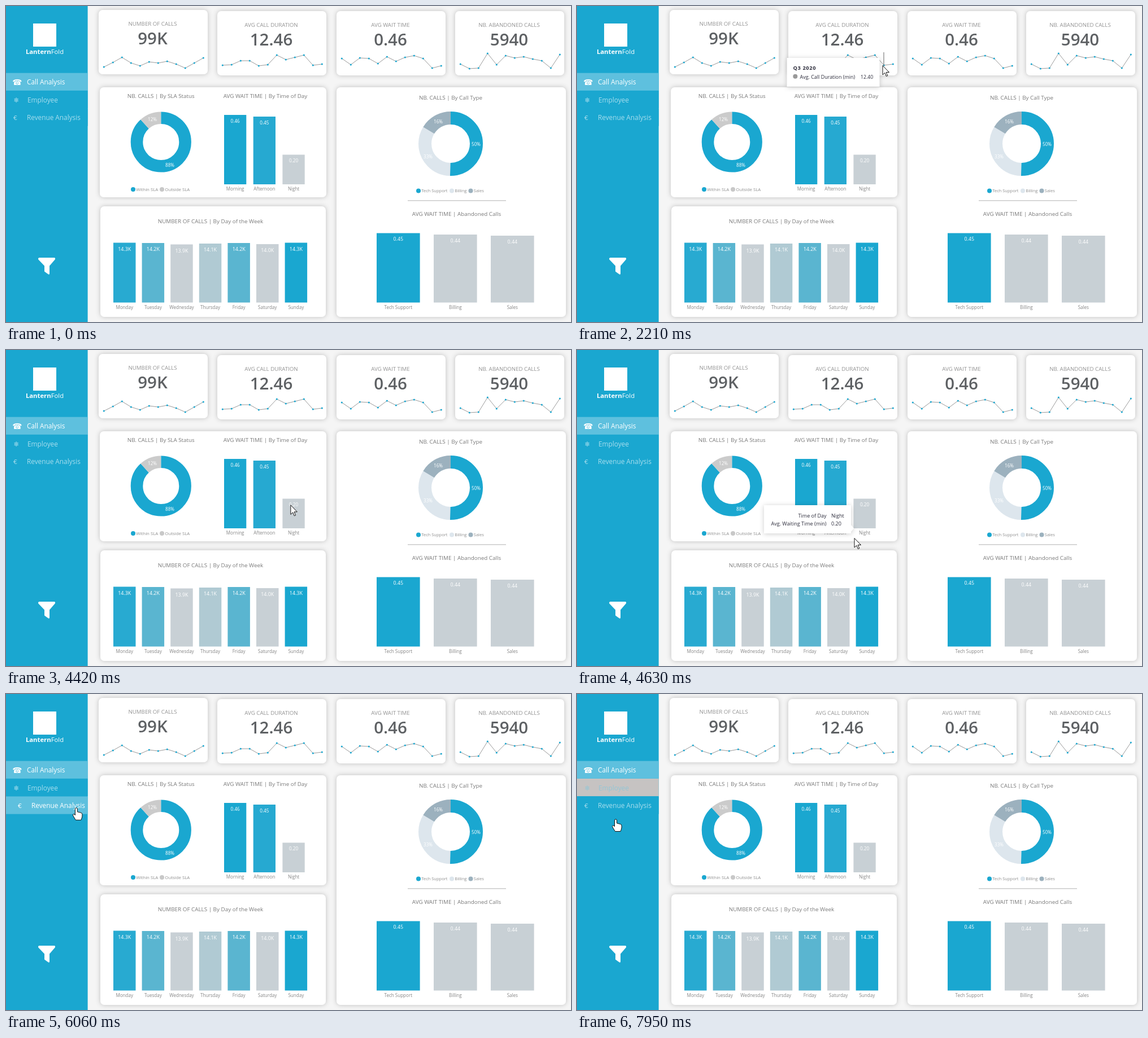
An HTML page that plays this animation: 1000 by 560 pixels, repeating every 8000 ms.

```html
<!DOCTYPE html>
<html lang="en">
<head>
<meta charset="utf-8">
<title>Call dashboard</title>
<style>
  html, body { margin: 0; width: 100%; height: 100%; overflow: hidden; background: #f5f5f5; }
  svg { display: block; width: 100%; height: 100%; font-family: "Open Sans", "Noto Sans", sans-serif; }
  .icon { font-family: "DejaVu Sans", sans-serif; }
  .card { fill: #fff; filter: drop-shadow(0 0 4px rgba(0, 0, 0, .22)); }
  .tip path { fill: #fff; filter: drop-shadow(0 1px 4px rgba(0, 0, 0, .2)); }
</style>
</head>
<body>
<svg id="stage" viewBox="0 0 1000 560"></svg>
<script>
const BLUE = '#1aa7d0', GREY = '#c8d0d5', HOVER = '#5ec0de', INK = '#2b2b3a';
const LOOP = 8000, MENU = 144.6;

// Text is placed by the vertical centre of its capitals.
const text = (s, x, y, size, fill, anchor = 'middle', extra = '') =>
  `<text x="${x}" y="${y + size * .36}" font-size="${size}" fill="${fill}" text-anchor="${anchor}" ${extra}>${s}</text>`;
const rect = (x, y, w, h, fill, extra = '') =>
  `<rect x="${x}" y="${y}" width="${w}" height="${h}" fill="${fill}" ${extra}/>`;
const dot = (x, y, r, fill) => `<circle cx="${x}" cy="${y}" r="${r}" fill="${fill}"/>`;
const card = (x, y, w, h) => rect(x, y, w, h, '#fff', 'rx="7" class="card"');
const title = (s, x, y) => text(s, x, y, 9.85, '#7a7a7a');

function kpi(x, y, label, value, heights) {
  const pts = heights.map((h, i) => [x + 9.3 + i * 16, h]);
  return card(x, y, 193, 114) +
    text(label, x + 95.5, y + 24.3, 9.7, '#939393') +
    text(value, x + 95.5, y + 50.6, 29.5, '#5e6164', 'middle', 'font-weight="600"') +
    `<polyline points="${pts.join(' ')}" fill="none" stroke="#9a9a9a"/>` +
    pts.map(p => dot(...p, 1.6, BLUE)).join('');
}

function donut(x, y, r, width, slices) {
  let start = 0;
  return slices.map(([share, fill]) => {
    const arc = `<circle cx="${x}" cy="${y}" r="${r}" fill="none" stroke="${fill}" stroke-width="${width}"
      pathLength="100" stroke-dasharray="${share} ${100 - share}" stroke-dashoffset="${-start}"
      transform="rotate(-90 ${x} ${y})"/>`;
    start += share;
    return arc;
  }).join('');
}

// Each bar: name, value, top, colour.
const bars = (x, step, w, bottom, labelSize, nameY, list) =>
  list.map(([name, value, top, fill], i) => {
    const left = x + i * step, mid = left + w / 2;
    return rect(left, top, w, bottom - top, fill) +
      text(value, mid, top + 10.8, labelSize, '#fff') +
      text(name, mid, nameY, 8.05, '#858585');
  }).join('');

const legend = (y, size, list) => list.map(([x, name, fill]) =>
  dot(x, y, 4, fill) + text(name, x + 5.3, y, size, '#8f8f8f', 'start')).join('');

const row = (id, y, icon, iconX, iconSize, name, nameX) => `<g id="${id}">` +
  rect(0, y, MENU, 31.2, BLUE) + '<g>' +
  text(icon, iconX, y + 16.3, iconSize, 'inherit', 'middle', 'class="icon"') +
  text(name, nameX, y + 16.3, 11.8, 'inherit', 'start') + '</g></g>';

// Tooltip with two label/value rows; side is where its pointer sits.
function tip(id, x, y, w, side, pointY, mid, rows) {
  const edge = side < 0 ? x : x + w;
  return `<g id="${id}" class="tip"><path d="M${x} ${y}h${w}v50h${-w}z
    M${edge} ${pointY - 6}l${5 * side} 6l${-5 * side} 6z"/>` +
    rows.map(([label, value], i) =>
      text(label, x + mid, y + 19 + i * 13.6, 9, INK, 'end') +
      text(value, x + mid + 8.5, y + 19 + i * 13.6, 9, INK, 'start')).join('') + '</g>';
}

const stage = document.getElementById('stage');
stage.innerHTML =
  rect(0, 0, MENU, 560, BLUE) +
  rect(48, 31, 41, 41, '#fff') +
  text('<tspan font-weight="700">Lantern</tspan>Fold', 68.5, 80.5, 11.3, '#fff') +
  row('calls', 118.7, '☎\uFE0E', 20, 14, 'Call Analysis', 37) +
  row('employee', 150, '❄\uFE0E', 18.5, 12, 'Employee', 38) +
  row('revenue', 181.5, '€', 16.5, 11, 'Revenue Analysis', 37) +
  '<path d="M58.500 446H86Q88 447.500 86.500 449.500L77 460.500V474.500Q76.500 476.500 75 475.500L68 470.500V460.500L57.500 449.500Q56 447.500 58.500 446Z" fill="#fff"/>' +

  kpi(164, 7, 'NUMBER OF CALLS', '99K', [108, 100, 91, 101, 106, 99, 101, 98, 103, 110, 101, 92]) +
  kpi(374, 9, 'AVG CALL DURATION', '12.46', [105, 104, 97, 97, 106, 104, 87, 95, 91, 87, 105, 103]) +
  kpi(585, 9, 'AVG WAIT TIME', '0.46', [93, 104, 92, 93, 102, 90, 98, 91, 88, 93, 110, 106]) +
  kpi(795, 9, 'NB. ABANDONED CALLS', '5940', [103, 111, 110, 84, 104, 88, 92, 90, 94, 97, 110, 86]) +

  card(166, 144, 401, 195) +
  title('NB. CALLS | By SLA Status', 274.3, 159) +
  donut(274.3, 241, 42.8, 21.6, [[88.25, BLUE], [11.75, '#cbcbcb']]) +
  text('88%', 290, 282, 8.1, '#fff') + text('12%', 259, 201.5, 8.1, '#fff') +
  legend(325, 7.85, [[225, 'Within SLA', BLUE], [276, 'Outside SLA', '#c8c8c8']]) +
  title('AVG WAIT TIME | By Time of Day', 459, 159) +
  bars(386, 51.7, 39.3, 316, 8.2, 324, [
    ['Morning', '0.46', 193, BLUE], ['Afternoon', '0.45', 196, '#26a9d1'], ['Night', '0.20', 263.5, GREY]]) +

  card(167, 355, 399, 196) +
  title('NUMBER OF CALLS | By Day of the Week', 362, 381) +
  bars(190, 50.6, 39.5, 525.5, 8.9, 534, [
    ['Monday', '14.3K', 419.5, '#28aad1'], ['Tuesday', '14.2K', 420, '#5ab5d0'],
    ['Wednesday', '13.9K', 422.5, GREY], ['Thursday', '14.1K', 421, '#b0cad3'],
    ['Friday', '14.2K', 420, '#5ab5d0'], ['Saturday', '14.0K', 422, GREY],
    ['Sunday', '14.3K', 419.5, BLUE]]) +

  card(585, 144, 406, 407) +
  title('NB. CALLS | By Call Type', 787, 162) +
  donut(787, 244, 45.5, 23, [[50.3, BLUE], [33.4, '#dde6ed'], [16.3, '#9cb1be']]) +
  text('50%', 832, 245, 8.1, '#fff') + text('33%', 747, 267, 8.1, '#fff') + text('16%', 765, 205, 8.1, '#fff') +
  legend(327.5, 7.5, [[730, 'Tech Support', BLUE], [789, 'Billing', '#dde6ed'], [822.5, 'Sales', '#9cb1be']]) +
  rect(711, 344.3, 174, 1.2, '#bdbdbd') +
  title('AVG WAIT TIME | Abandoned Calls', 797.5, 368) +
  bars(656, 101, 76.6, 525.5, 8.8, 534, [
    ['Tech Support', '0.45', 402.5, BLUE], ['Billing', '0.44', 405, GREY], ['Sales', '0.44', 407, GREY]]) +

  rect(542.5, 82, 1, 24, '#666', 'id="hair"') +
  '<g id="quarter" class="tip"><path d="M371.500 92h164v51h-164z"/>' +
  text('Q3 2020', 382.5, 109.5, 9.3, INK, 'start', 'font-weight="700" letter-spacing=".6"') +
  dot(386.3, 124.7, 4, '#999') +
  text('Avg. Call Duration (min)', 394.5, 125.5, 8.95, INK, 'start') +
  text('12.40', 502, 125.5, 8.7, INK, 'start') + '</g>' +
  tip('night', 331, 275, 154, 1, 316, 110.5, [['Time of Day', 'Night'], ['Avg. Waiting Time (min)', '0.20']]) +
  tip('morning', 396, 286, 159, -1, 296, 110.5, [['Time of Day', 'Morning'], ['Avg. Waiting Time (min)', '0.46']]) +
  tip('sla', 320, 232, 153, -1, 242, 70, [['SLA Status', 'Within SLA'], ['Total Nb. Calls', '87345 (88.25%)']]) +

  '<g fill="#fff" stroke="#111" stroke-linejoin="round">' +
  '<path id="arrow" d="M.5 .5V17L4.300 13.400 6.900 19.500 9.300 18.500 6.700 12.500H12Z"/>' +
  '<path id="hand" d="M-2 2Q-2 0 0 0T2 2V7L8 8.500Q10.500 9 10.500 11.500V15Q10 18 8.500 21.500H-1L-5 15Q-7 11.500 -5 11T-2 13Z"/></g>';

// Pointer keys: time, x, y. Equal neighbours are rests.
const keys = [
  [500, 886, 504], [1250, 578, 114], [1810, 540.5, 105], [4000, 540.5, 105],
  [4630, 490.5, 333], [4760, 484, 359], [5170, 305.5, 241.5], [5570, 305.5, 241.5],
  [6270, 75, 191], [6620, 77, 164], [7740, 77, 164], [7950, 68.5, 222], [LOOP, 68.5, 222]];
const ease = p => p * p * (3 - 2 * p);

function pointer(t) {
  const i = Math.max(1, keys.findIndex(k => k[0] > t));
  const [t0, x0, y0] = keys[i - 1], [t1, x1, y1] = keys[i];
  const p = ease(Math.max(0, (t - t0) / (t1 - t0)));
  return [x0 + (x1 - x0) * p, y0 + (y1 - y0) * p];
}

const el = id => document.getElementById(id);
const show = (id, on) => el(id).setAttribute('visibility', on ? 'visible' : 'hidden');

function paintRow(id, back, ink, shift) {
  const [box, label] = el(id).children;
  box.setAttribute('fill', back);
  label.setAttribute('transform', `translate(${shift} 0)`);
  for (const part of label.children) part.setAttribute('fill', ink);
}

function draw(t) {
  const [x, y] = pointer(t), inMenu = x < MENU;
  const during = (a, b) => t >= a && t < b;

  show('hair', during(1700, 4120));
  show('quarter', during(2210, 4120));
  show('night', during(4490, 4700));
  show('morning', during(4970, 5040));
  show('sla', during(5170, 5700));

  const plain = [BLUE, '#a8deee', 0], hot = [HOVER, '#fff', 8];
  const pressed = ['#c6c3c2', '#93c6d6', t < 7550 ? 8 : 0];
  paintRow('calls', HOVER, '#fff', 0);
  paintRow('revenue', ...(inMenu && y >= 181 && t < 7000 ? hot : plain));
  paintRow('employee', ...(t >= 7420 ? pressed : inMenu && y < 181 ? hot : plain));

  show('arrow', t >= 500 && !inMenu);
  show('hand', inMenu);
  for (const id of ['arrow', 'hand']) el(id).setAttribute('transform', `translate(${x} ${y})`);
}

const begin = performance.now();
function frame() {
  draw((performance.now() - begin) % LOOP);
  requestAnimationFrame(frame);
}
frame();
</script>
</body>
</html>
```
